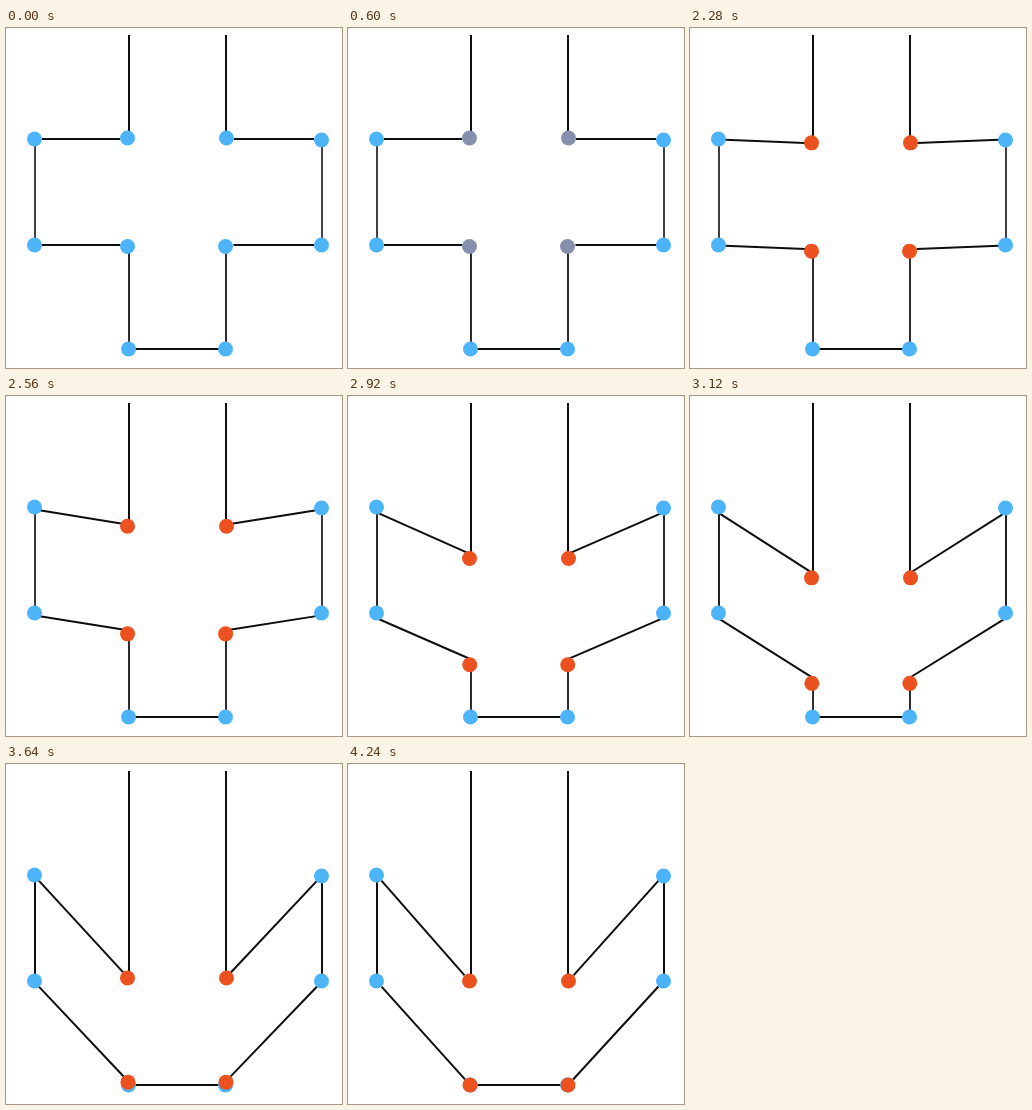
Recreate the animation shown at these times as an HTML page with a canvas. Size 336 px wide and 340 px high, loop 4280 ms.

```html
<!DOCTYPE html>
<html lang="en">
<head>
<meta charset="utf-8">
<title>Folding outline</title>
<style>
  html, body { margin: 0; width: 100%; height: 100%; overflow: hidden; background: #fff; }
  canvas { display: block; width: 336px; height: 340px; }
</style>
</head>
<body>
<canvas id="stage"></canvas>
<script>
const W = 336, H = 340, LOOP = 4280, STEP = 40;
const R = 7.5;
const BLUE = [77, 180, 250], ORANGE = [236, 81, 32];

const canvas = document.getElementById('stage');
const ctx = canvas.getContext('2d');
const dpr = window.devicePixelRatio || 1;
canvas.width = W * dpr;
canvas.height = H * dpr;
ctx.scale(dpr, dpr);

const lerp = (a, b, p) => a + (b - a) * p;
const mix = (a, b, p) => `rgb(${a.map((v, i) => Math.round(lerp(v, b[i], p)))})`;

// cubic-bezier(.42, 0, .58, 1), solved by bisection
function easeInOut(u) {
  if (u <= 0) return 0;
  if (u >= 1) return 1;
  let lo = 0, hi = 1, s;
  for (let i = 0; i < 30; i++) {
    s = (lo + hi) / 2;
    const x = 1.26 * s * (1 - s) ** 2 + 1.74 * s * s * (1 - s) + s ** 3;
    if (x < u) lo = s; else hi = s;
  }
  return s * s * (3 - 2 * s);
}

const phase = (t, from, to) => easeInOut((t - from) / (to - from));

function line(x1, y1, x2, y2, shade = 14) {
  ctx.strokeStyle = `rgb(${shade},${shade},${shade})`;
  ctx.beginPath();
  ctx.moveTo(x1, y1);
  ctx.lineTo(x2, y2);
  ctx.stroke();
}

function dot(x, y, color) {
  ctx.fillStyle = color;
  ctx.beginPath();
  ctx.arc(x, y, R, 0, Math.PI * 2);
  ctx.fill();
}

// Rim-to-rim connector as centre, angle and length
function connector(x1, y1, x2, y2) {
  const dx = x2 - x1, dy = y2 - y1;
  return {
    x: (x1 + x2) / 2,
    y: (y1 + y2) / 2,
    angle: Math.atan(dy / dx),
    length: Math.hypot(dx, dy) - 2 * R
  };
}

// Arms turn and stretch about their moving centre
function arm(a, b, p) {
  const x = lerp(a.x, b.x, p), y = lerp(a.y, b.y, p);
  const angle = lerp(a.angle, b.angle, p);
  const half = lerp(a.length, b.length, p) / 2;
  const dx = Math.cos(angle) * half, dy = Math.sin(angle) * half;
  line(x - dx, y - dy, x + dx, y + dy);
}

const arms = [
  [28.5, 121.5, 111, 217],
  [315.5, 220.5, 111, 217],
  [28.5, 122, 217, 321],
  [315.5, 220, 217, 321]
].map(([x1, x2, y1, y2]) => [connector(x1, y1, x2, y1), connector(x1, y1, x2, y2)]);

const fixedDots = [
  [28.5, 111], [315.5, 112], [28.5, 217], [315.5, 217], [122.5, 321], [219.5, 321]
];

function draw(t) {
  const tint = phase(t, 0, 1440);
  const fold = phase(t, 2000, 3860);
  const upper = lerp(110, 217, fold);
  const lower = lerp(218.5, 321, fold);

  ctx.fillStyle = '#bbb';
  ctx.fillRect(0, 0, W, H);
  ctx.fillStyle = '#fff';
  ctx.beginPath();
  ctx.roundRect(0, 0, W, H, 1.5);
  ctx.fill();

  ctx.lineWidth = 2;
  for (const x of [123, 220]) {
    line(x, 7, x, upper);
    line(x, lower, x, 321, 45);
  }
  const sideShade = Math.round(lerp(66, 14, fold));
  line(29, 111, 29, 217, sideShade);
  line(316, 112, 316, 217, sideShade);
  line(122.5, 321, 219.5, 321);
  for (const [a, b] of arms) arm(a, b, fold);

  for (const [x, y] of fixedDots) dot(x, y, mix(BLUE, BLUE, 0));
  const color = mix(BLUE, ORANGE, tint);
  dot(121.5, upper, color);
  dot(220.5, upper, color);
  dot(lerp(121.5, 122, fold), lower, color);
  dot(lerp(219.5, 220, fold), lower, color);
}

const start = performance.now();
function tick() {
  const t = (performance.now() - start) % LOOP;
  draw(Math.floor(t / STEP) * STEP);
  requestAnimationFrame(tick);
}
tick();
</script>
</body>
</html>
```
